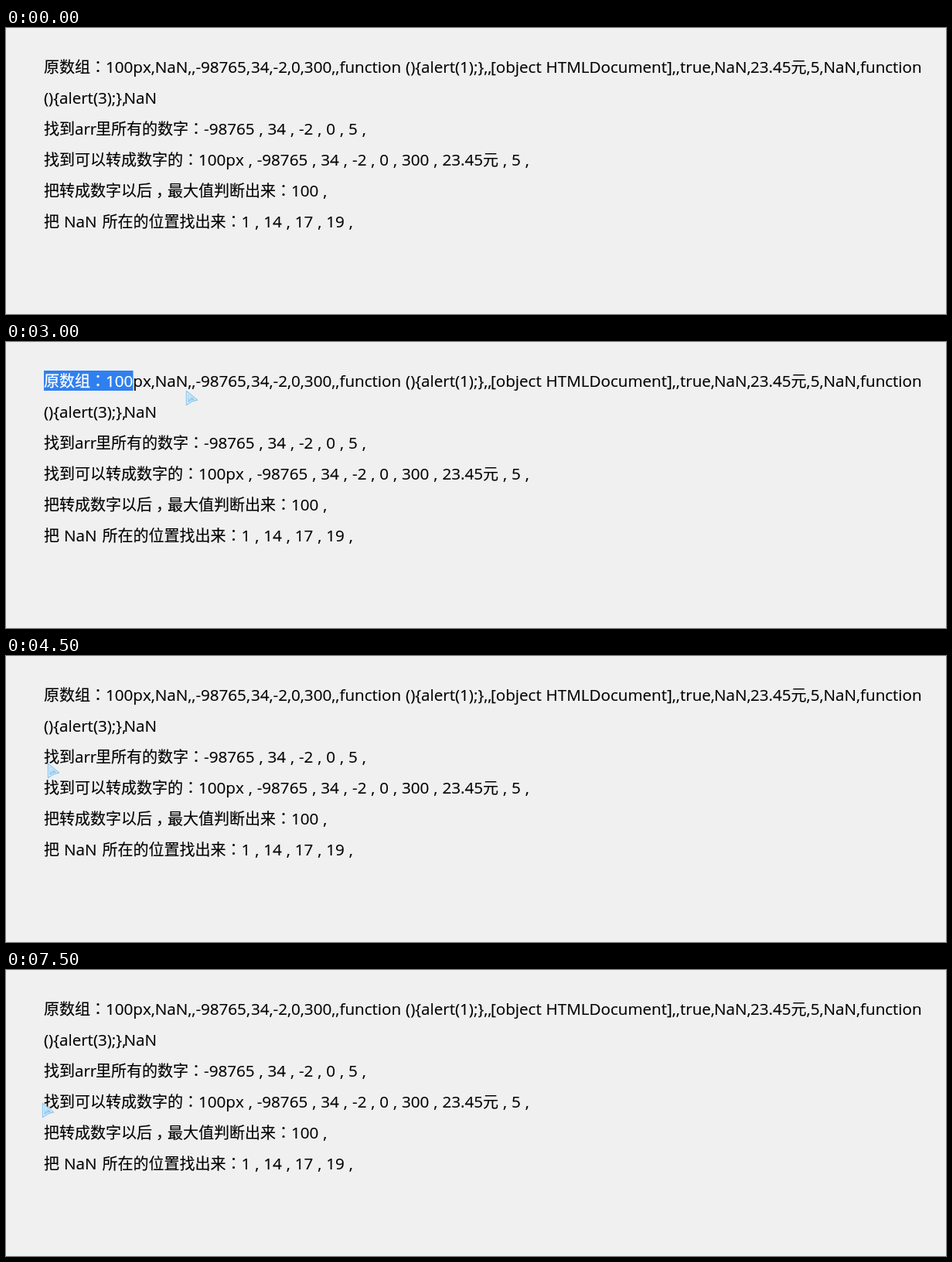
Animation, 1216 px wide and 370 px high, one loop 8 s. Source, as an HTML page:

```html
<!DOCTYPE html>
<html lang="zh-CN">
<head>
<meta charset="utf-8">
<style>
html, body { margin: 0; width: 100%; height: 100%; overflow: hidden; background: #f0f0f0; }
svg { display: block; width: 1216px; height: 370px; }
text { font: 20.6px "Open Sans", "Noto Sans", sans-serif; word-spacing: .6px; font-kerning: none; white-space: pre; }
.han { font: 20px "Noto Sans CJK SC", "Noto Sans CJK", sans-serif; }
.colon { font: 20px "Noto Sans CJK JP", "Noto Sans CJK", sans-serif; }
</style>
</head>
<body>
<svg viewBox="0 0 1216 370" xmlns="http://www.w3.org/2000/svg">
  <defs>
    <linearGradient id="ice" x1="0" y1="0" x2=".55" y2="1">
      <stop offset="0" stop-color="#f4fbff"/>
      <stop offset=".5" stop-color="#b9e0f8"/>
      <stop offset="1" stop-color="#5fb0e6"/>
    </linearGradient>
    <clipPath id="picked"><path id="clip"/></clipPath>
  </defs>
  <g id="words" fill="#000" stroke="#000" stroke-width=".15"></g>
  <path id="mark" fill="#2f80ef"/>
  <g id="lit" fill="#fff" stroke="#fff" stroke-width=".25" clip-path="url(#picked)"></g>
  <g id="cursor" stroke-linejoin="round">
    <path d="M1.5 1.5 L15.5 13 L8.5 14.8 L1.5 19.5 Z" fill="#eef8fe" stroke="#94c9ec" stroke-width="1.4"/>
    <path d="M3.6 5.6 L11.8 12.3 L7.6 13.2 L3.6 16 Z" fill="url(#ice)" stroke="#86c3ea" stroke-width=".7"/>
  </g>
</svg>
<script>
const NS = "http://www.w3.org/2000/svg";
const $ = id => document.getElementById(id);
const STEP = 500, LOOP = 8000;

// [row, x, text]
const runs = [
  [0, 49, "原数组："], [0, 129, "100px,NaN,,"], [0, 245.4, "-98765,"], [0, 317, "34,-2,0,300,,"],
  [0, 431.5, "function (){alert(1);},,"], [0, 627, "[object HTMLDocument],,"],
  [0, 872, "true,"], [0, 916, "NaN,"], [0, 963, "23.45元,5,NaN,function"],
  [1, 49, "(){alert(3);},"], [1, 152.5, "NaN"],
  [2, 49, "找到arr"], [2, 116, "里所有的数字："], [2, 256, "-98765 , 34 , -2 , 0 , 5 ,"],
  [3, 49, "找到可以转成数字的："], [3, 249, "100px , -98765 , 34 ,"],
  [3, 448, "-2 , 0 , 300 ,"], [3, 564.5, "23.45元 , 5 ,"],
  [4, 49, "把转成数字以后"], [4, 194, "，"], [4, 209, "最大值判断出来："], [4, 369, "100 ,"],
  [5, 49, "把 NaN "], [5, 124.5, "所在的位置找出来："], [5, 304.6, "1 , 14 , 17 , 19 ,"]
];

function make(tag, parent, attrs) {
  const el = document.createElementNS(NS, tag);
  for (const k in attrs) el.setAttribute(k, attrs[k]);
  return parent.appendChild(el);
}

for (const [row, x, str] of runs) {
  const text = make("text", $("words"), { x, y: 58 + row * 40 });
  for (const part of str.match(/：|[\u4e00-\u9fff，]+|[ -~]+/g)) {
    // Japanese glyph form centres the colon in its cell
    const look = part === "：" ? { class: "colon", lang: "ja" }
      : { class: part < "\u007f" ? "latin" : "han" };
    make("tspan", text, look).textContent = part;
  }
}
for (const t of $("words").children) $("lit").appendChild(t.cloneNode(true));

const bar = (right, top, bottom) => `M49 ${top}H${right}V${bottom}H49Z`;
const start = bar(164.5, 37, 63);
const whole = bar(1191, 37, 63) + bar(197, 63, 103);
const label = bar(235, 103, 143);
const row3 = bar(467, 103, 143);

// cursor x, y and selected area, one entry per step
const poses = [
  null, [842, 317], [135, 10], [47, 35], [49, 44], [49, 45],
  [232, 62, start], [327, 95, whole], [347, 100, whole],
  [53, 138], [50, 127], [231, 124, label], [455, 127, row3], [465, 129, row3],
  [365, 162], [46, 171]
];

function draw(ms) {
  const pose = poses[Math.floor(ms % LOOP / STEP)];
  const [x, y, area = ""] = pose || [0, 0];
  $("cursor").setAttribute("visibility", pose ? "visible" : "hidden");
  $("cursor").setAttribute("transform", `translate(${x} ${y})`);
  $("mark").setAttribute("d", area);
  $("clip").setAttribute("d", area);
  $("lit").setAttribute("visibility", area ? "visible" : "hidden");
}

const t0 = performance.now();
function tick() {
  draw(performance.now() - t0);
  requestAnimationFrame(tick);
}
tick();
</script>
</body>
</html>
```
